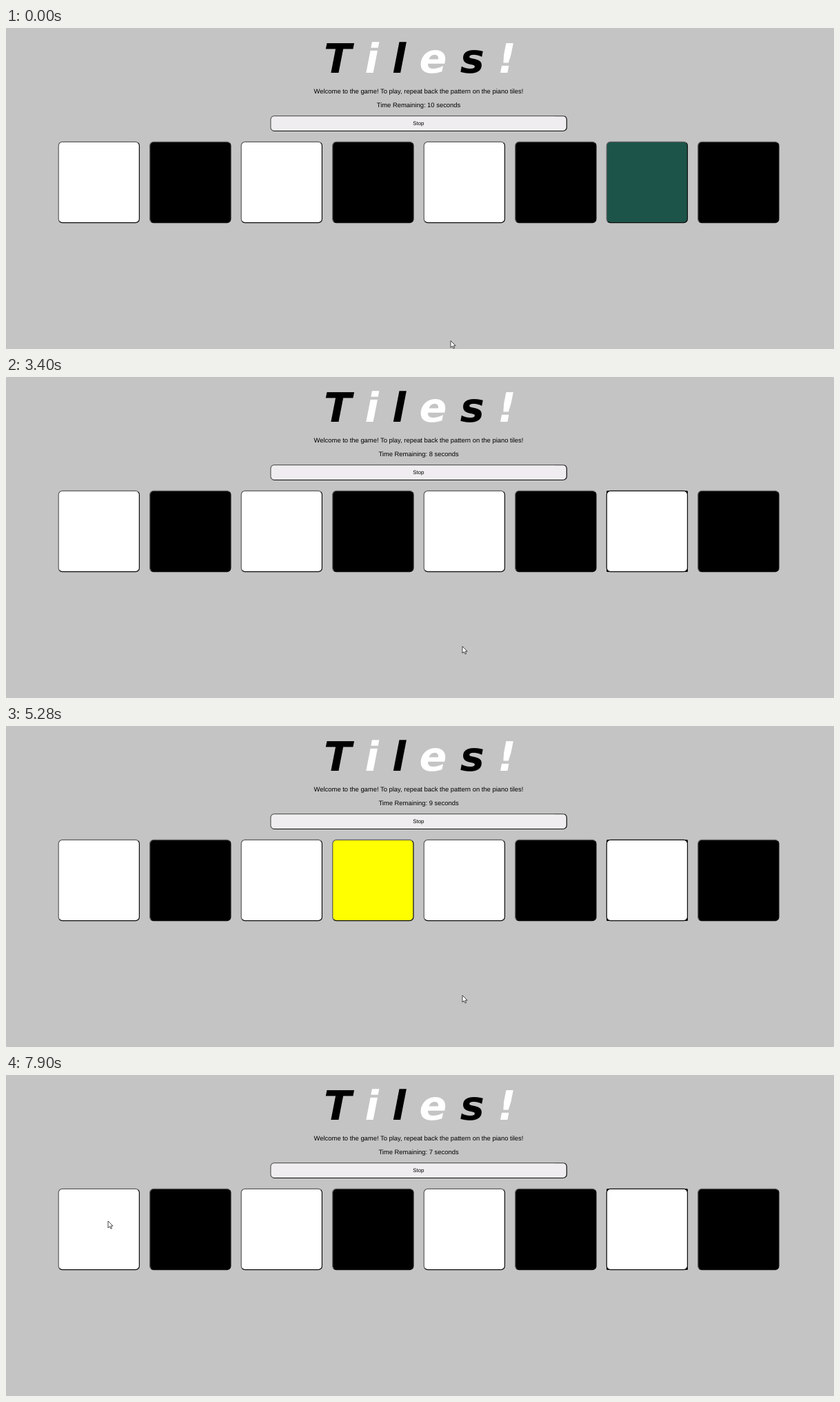
An HTML page for the animation above (8 s loop, 1201x466 px).

```html
<!DOCTYPE html>
<html lang="en">
<head>
<meta charset="utf-8">
<title>Tiles!</title>
<style>
  html, body { margin: 0; width: 100%; height: 100%; overflow: hidden; background: #c4c4c4; }
  svg { display: block; width: 1201px; height: 466px; }
  text { font: 9.42px "Liberation Sans", Arial, sans-serif; text-anchor: middle;
         text-rendering: geometricPrecision; white-space: pre; }
  .title { font: italic bold 58.9px "DejaVu Sans", Verdana, sans-serif; word-spacing: -1.2px; }
  .title tspan { fill: #fff; }
  .stop { font-size: 7.85px; }
  .box { stroke: url(#bevel); stroke-width: 1.2; }
</style>
</head>
<body>
<svg viewBox="0 0 1201 466">
  <defs>
    <linearGradient id="bevel" x2="1" y2="1">
      <stop offset=".5" stop-color="#5c5c5c"/>
      <stop offset=".5" stop-color="#0c0c0c"/>
    </linearGradient>
  </defs>
  <text class="title" x="600.5" y="65.3">T <tspan>i</tspan> l <tspan>e</tspan> s <tspan>!</tspan></text>
  <text x="598.5" y="95">Welcome to the game! To play, repeat back the pattern on the piano tiles!</text>
  <text id="timer" x="598.5" y="115"></text>
  <rect class="box" x="383.9" y="127.6" width="429.4" height="21.9" rx="5.3" fill="#efedef"/>
  <text class="stop" x="598.4" y="141">Stop</text>
  <rect id="focus" x="871" y="165" width="118" height="118" rx="1.5"/>
  <g id="tiles"></g>
  <circle id="ring" cx="917.2" cy="252" r="5.4" fill="none" stroke="#c8d2d0" stroke-width=".8"/>
  <path id="cursor" d="M0 0V17L4 13.2L6.8 19L9.4 18L6.9 12.2H12Z" fill="#fff" stroke="#000" stroke-width="1.2"/>
</svg>
<script>
const LOOP = 8000;
const ROUNDS = [-320, 3860];   // start of each demonstrated pattern
const PATTERN = [6, 3];        // tiles shown in turn
const BEAT = 1140, LIT = 870;  // time between tiles, time lit
const CLICKS = [2460, 6930];   // presses of the first pattern tile
const PRESS = 400;
const GLOW = { 6: "#1d544a", 3: "#ff0" };

// cursor stops: leave, arrive, x, y
const PATH = [
  [150, 270, 656, 437],
  [550, 1420, 656, 431],
  [1840, 2460, 917, 251],
  [2860, 3400, 662, 391],
  [5950, 6510, 815, 255],
  [6650, 6930, 905, 250],
  [7300, 7900, 148, 212]
];

const $ = id => document.getElementById(id);
const show = (id, on) => $(id).style.display = on ? "" : "none";
const within = (t, start, length) => t >= start && t < start + length;

const tiles = Array.from({ length: 8 }, (_, i) => {
  const tile = document.createElementNS("http://www.w3.org/2000/svg", "rect");
  const attrs = { class: "box", x: 76.2 + 132.51 * i, y: 165.4, width: 117.2, height: 117.2, rx: 5.3 };
  for (const key in attrs) tile.setAttribute(key, attrs[key]);
  return $("tiles").appendChild(tile);
});

function isLit(i, t) {
  const shown = ROUNDS.some(start => PATTERN.some((tile, n) =>
    tile === i && t < (start < 0 ? CLICKS[0] : LOOP) && n * BEAT + start > -BEAT &&
    !(start < 0 && n) && within(t, start + n * BEAT, LIT)));
  return shown || i === PATTERN[0] && CLICKS.some(click => within(t, click, PRESS));
}

// The first clock stops at the first click; the second starts with the new round.
function secondsLeft(t) {
  const restart = ROUNDS[1] + 280;
  const since = t < restart ? Math.min(t, CLICKS[0]) - ROUNDS[0] : t - ROUNDS[1];
  return 10 - Math.max(0, Math.floor((since - 420) / 1000));
}

function cursorAt(t) {
  let x = 645, y = 454;
  for (const [leave, arrive, toX, toY] of PATH) {
    const part = Math.min(1, Math.max(0, (t - leave) / (arrive - leave)));
    x += (toX - x) * part;
    y += (toY - y) * part;
  }
  return [x, y];
}

function draw(now) {
  const t = now % LOOP;
  const focused = t >= CLICKS[0];
  $("timer").textContent = `Time Remaining: ${secondsLeft(t)} seconds`;
  tiles.forEach((tile, i) =>
    tile.setAttribute("fill", isLit(i, t) ? GLOW[i] : i % 2 ? "#000" : "#fff"));
  tiles[PATTERN[0]].style.stroke = focused ? "#0c0c0c" : "";
  show("focus", focused);
  show("ring", within(t, CLICKS[0], PRESS));
  $("cursor").setAttribute("transform", `translate(${cursorAt(t)}) scale(.589)`);
  requestAnimationFrame(draw);
}
draw(performance.now());
</script>
</body>
</html>
```
